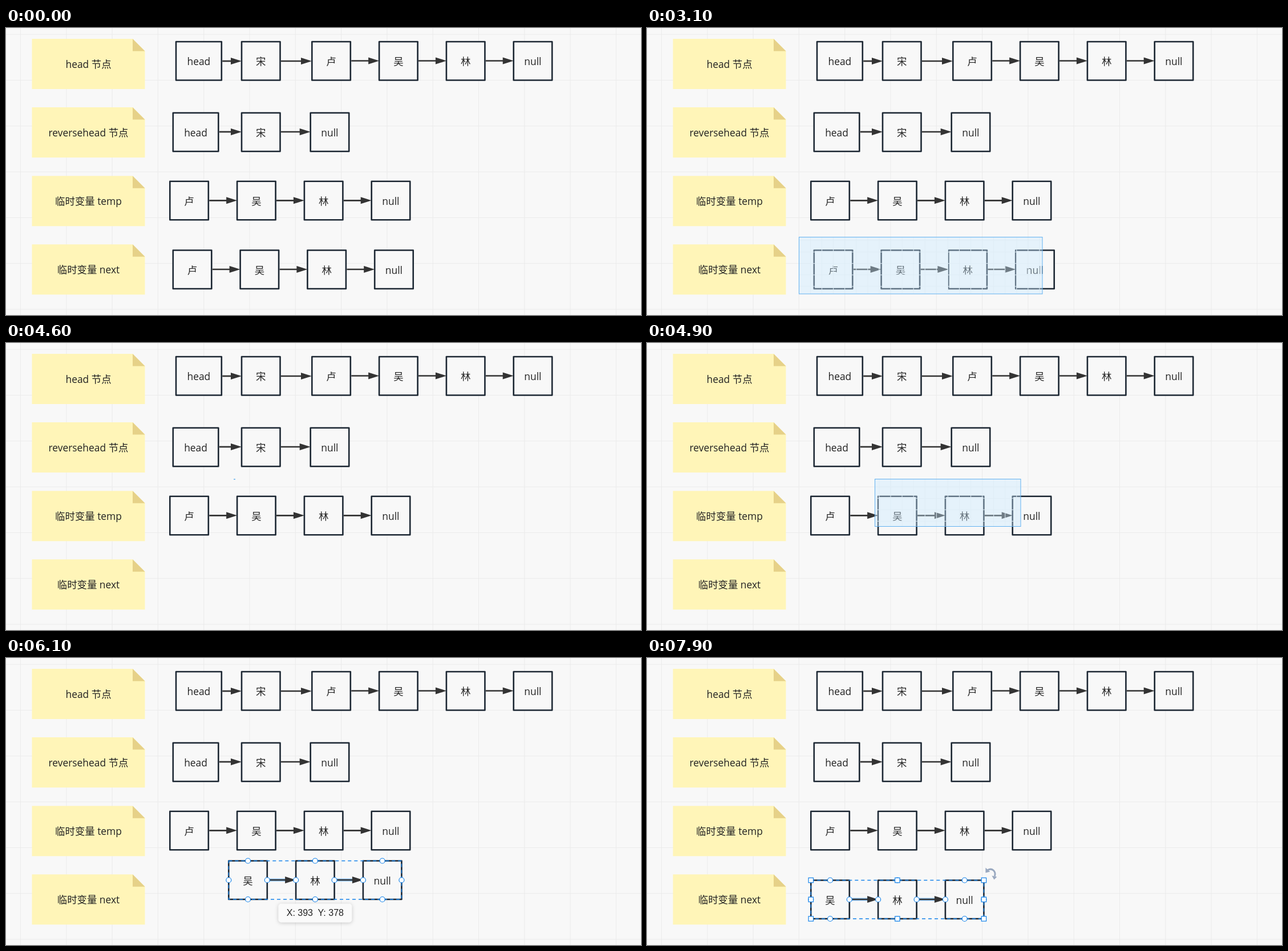
Write an HTML page that moves like this. It is 1113 px wide and 503 px high and loops after 8 s.

```html
<!DOCTYPE html>
<html lang="zh">
<head>
<meta charset="utf-8">
<style>
html, body { margin: 0; width: 100%; height: 100%; overflow: hidden; background: #f8f8f8; }
svg { display: block; width: 1113px; height: 503px; }
text { font: 17.4px "Open Sans", "Noto Sans CJK SC", "Noto Sans CJK", sans-serif; fill: #222; text-anchor: middle; white-space: pre; }
.box { fill: #f8f8f8; stroke: #1c2733; stroke-width: 2.6; stroke-linejoin: round; }
.line { stroke: #333; stroke-width: 2.7; }
.head { fill: #333; }
.halo { stroke: #8cc6fa; stroke-width: 5; }
.handle { fill: #fff; stroke: #1583ea; stroke-width: 1.2; }
.frame { fill: none; stroke: #1583ea; stroke-width: 1.3; stroke-dasharray: 6 5; }
.marquee { fill: #c8e8ff; fill-opacity: .4; stroke: #62b1f0; }
.turn { fill: none; stroke: #9aa9c0; stroke-width: 3; }
.tip { fill: #fafafa; filter: drop-shadow(0 1px 3px #0003); }
.tip + text { font: 16px "Liberation Sans", Arial, sans-serif; }
</style>
</head>
<body>
<svg viewBox="0 0 1113 503"><g id="still"></g><g id="live"></g></svg>
<script>
const LOOP = 8000, STEP = 100, SIZE = 67.5, PITCH = 117.8, GRID = 80.3;
const still = document.getElementById('still'), live = document.getElementById('live');

const rect = (cls, x, y, w, h, more = '') =>
  `<rect class="${cls}" x="${x}" y="${y}" width="${w}" height="${h}" ${more}/>`;
const label = (x, y, s) => `<text x="${x}" y="${y}">${s}</text>`;
const box = (x, y, s, w = SIZE) =>
  rect('box', x, y, w, SIZE) + label(x + w / 2, y + 41, s);

function arrow(x1, x2, y, halo) {
  const line = cls => `<path class="${cls}" d="M${x1 + 1.5} ${y}H${x2 - 15}"/>`;
  return (halo ? line('halo') : '') + line('line') +
    `<path class="head" d="M${x2} ${y}l-19 -6v12z"/>`;
}

// Evenly spaced boxes joined by arrows
function chain(x, y, names, halo) {
  return names.map((s, i) => {
    const left = x + i * PITCH;
    return box(left, y, s) +
      (i < names.length - 1 ? arrow(left + SIZE, left + PITCH, y + 33.5, halo) : '');
  }).join('');
}

function lines(pitch, x0, y0, x1, y1, color) {
  let d = '';
  const first = (from, origin) => origin + Math.ceil((from - origin) / pitch) * pitch;
  for (let x = first(x0, 25.5); x < x1; x += pitch) d += `M${x} ${y0}V${y1}`;
  for (let y = first(y0, 11.2); y < y1; y += pitch) d += `M${x0} ${y}H${x1}`;
  return `<path d="${d}" stroke="${color}"/>`;
}

const note = (y, s) =>
  `<path fill="#fff5b8" d="M45.5 ${y}H222l21.5 21.5V${y + 88}H45.5z"/>
   <path fill="#e6d188" d="M222 ${y}v21.5h21.5z"/>` + label(144.5, y + 50.5, s);

const dot = (x, y) => `<circle class="handle" cx="${x}" cy="${y}" r="4.5"/>`;
const knob = (x, y) => rect('handle', x - 4.2, y - 4.2, 8.4, 8.4);

const ports = (x, y) => {
  const h = SIZE / 2;
  return dot(x + h, y) + dot(x + h, y + SIZE) + dot(x, y + h) + dot(x + SIZE, y + h);
};

// Selection around a chain; resize knobs and turn icon vanish while dragging
function selection(x, y, count, dragging) {
  const w = (count - 1) * PITCH + SIZE, right = x + w;
  let out = rect('frame', x, y, w, SIZE);
  for (let i = 0; i < count; i++) out += ports(x + i * PITCH, y);
  if (dragging) return out;
  for (const kx of [x, x + w / 2, right])
    for (const ky of [y, y + SIZE / 2, y + SIZE])
      if (kx !== x + w / 2 || ky !== y + SIZE / 2) out += knob(kx, ky);
  return out + `<g transform="translate(${right} ${y})">
    <path class="turn" d="M7 -18C14 -22 22 -16 19 -7"/>
    <path fill="#9aa9c0" d="M3 -22v9l8 -2zM14 -8l9 2l-5 5z"/></g>`;
}

function marquee(x, y, [x2, y2]) {
  const w = Math.max(1, x2 - x), h = Math.max(.5, y2 - y);
  return lines(GRID / 4, x, y, x + w, y + h, '#eeefef') + rect('marquee', x, y, w, h);
}

function tip(x, y) {
  const cx = x + PITCH + SIZE / 2, top = y + 75;
  return rect('tip', cx - 64.5, top, 129, 33, 'rx="5"') +
    label(cx, top + 21.3, `X: ${Math.floor(x + 3)}  Y: ${Math.floor(y + 23)}`);
}

// Point at time t along [time, x, y] keys
function along(t, keys) {
  let i = 1;
  while (i < keys.length - 1 && t > keys[i][0]) i++;
  const a = keys[i - 1], b = keys[i];
  const k = Math.min(1, Math.max(0, (t - a[0]) / (b[0] - a[0])));
  return [a[1] + (b[1] - a[1]) * k, a[2] + (b[2] - a[2]) * k];
}

const TEMP = [287.3, 268.8], NEXT = [292.8, 389.5];
const REST = ['吴', '林', 'null'], ALL = ['卢', ...REST];
const HOVERS = [[300, 700, 2], [800, 1800, 1], [1900, 2200, 0]];
const SWEEP_NEXT = [[2900, 268, 367], [3000, 500, 432], [3100, 693, 466], [3700, 746.5, 469.5]];
const SWEEP_TEMP = [[4400, 400, 238.5], [4600, 401.5, 239], [4800, 560, 300], [5000, 750, 343], [5100, 772.5, 346.5]];
const DRAG = [[5600, 430.5, 290.5], [6100, 390.3, 355.5], [6600, 300, 394], [7000, 287.3, 389.5]];

still.innerHTML = lines(GRID, 0, 0, 1113, 503, '#ebebeb') +
  ['head 节点', 'reversehead 节点', '临时变量 temp', '临时变量 next']
    .map((s, i) => note(19 + i * 120.1, s)).join('') +
  box(298, 24, 'head', 79.8) + arrow(377.8, 413, 58) +
  box(413, 24, '宋') + arrow(480.5, 536, 58) + chain(536.3, 24, ALL) +
  box(292.8, 148.8, 'head', 79.5) + arrow(372.3, 413, 182) +
  box(413, 148.8, '宋') + arrow(480.5, 533.7, 182) + box(533.7, 148.8, 'null') +
  chain(...TEMP, ALL);

function draw(t) {
  let out = '';
  const within = (a, b) => t >= a && t < b;
  for (const [a, b, i] of HOVERS)
    if (within(a, b)) out += ports(TEMP[0] + i * PITCH, TEMP[1]);

  if (t < 4000) out += chain(...NEXT, ALL, t >= 3800);
  if (within(2900, 3800)) out += marquee(266.5, 366.5, along(t, SWEEP_NEXT));
  if (within(3800, 4000)) out += selection(...NEXT, 4);

  if (within(4400, 5200)) out += marquee(399.5, 238.5, along(t, SWEEP_TEMP));
  if (within(5200, 5500)) {
    const x = TEMP[0] + PITCH;
    out += chain(x, TEMP[1], REST, true) + selection(x, TEMP[1], 3);
  }
  if (t >= 5500) {
    const pos = along(t, DRAG), dragging = within(5700, 7500);
    out += chain(...pos, REST, true) + selection(...pos, 3, dragging);
    if (dragging) out += tip(...pos);
  }
  live.innerHTML = out;
}

let shown = -1;
function tick() {
  const t = Math.floor(performance.now() % LOOP / STEP) * STEP;
  if (t !== shown) draw(shown = t);
  requestAnimationFrame(tick);
}
tick();
</script>
</body>
</html>
```
